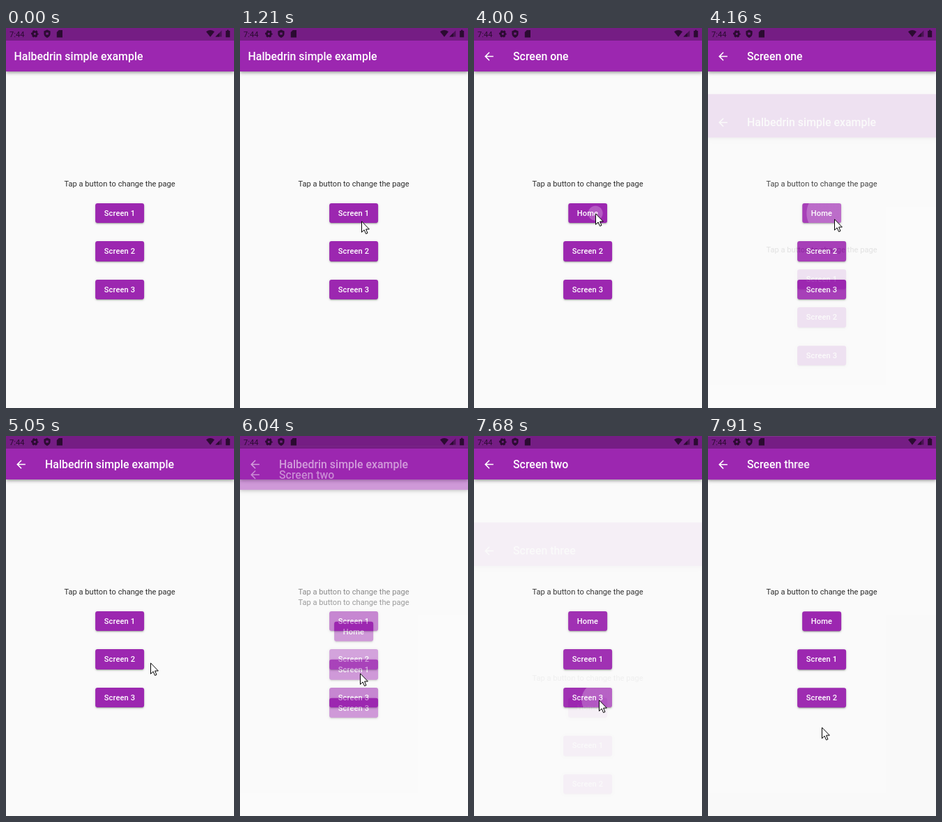
An HTML page for the animation above (7990 ms loop, 327 by 542 pixels).

```html
<!DOCTYPE html>
<html lang="en">
<head>
<meta charset="utf-8">
<title>Screen navigation</title>
<style>
  html, body { margin: 0; width: 100%; height: 100%; overflow: hidden; background: #fafafa; }
  body { position: relative; font: 11.13px Roboto, sans-serif; }
  .page, .bar, .title, .back, .hint, .button, #status, #cursor { position: absolute; }
  .page { left: 0; top: 0; width: 327px; height: 542px; background: #fafafa; color: rgba(0, 0, 0, .82); }
  .bar {
    left: 0; top: 0; width: 100%; height: 62px; background: #9c27b0;
    box-shadow: 0 1.6px 3.2px -.8px #0003, 0 3.2px 4px #00000024, 0 .8px 8px #0000001f;
  }
  .title { top: 18px; font-size: 15.9px; font-weight: 500; line-height: 46px; color: #fff; white-space: nowrap; }
  .back { left: 11.6px; top: 31px; width: 19px; height: 19px; fill: #fff; }
  .hint { top: 212px; width: 326px; line-height: 21px; text-align: center; }
  .button {
    left: 163px; transform: translateX(-50%); height: 28.6px; padding: 0 12.7px; border-radius: 3.2px;
    line-height: 30px; font-weight: 500; letter-spacing: .1px; color: #fff; background: #9c27b0; white-space: nowrap;
    box-shadow: 0 2.4px .8px -1.6px #0003, 0 1.6px 1.6px #00000024, 0 .8px 4px #0000001f;
  }
  #status, #cursor { left: 0; top: 0; }
</style>
</head>
<body>
<div id="pages"></div>

<svg id="status" width="327" height="18" fill="#2b0b31">
  <path d="M0 0H327V18H0Z" fill="#000" fill-opacity=".25"/>
  <text x="5" y="12.5" font-family="Roboto, sans-serif" font-size="11.13">7:44</text>
  <g fill="none" stroke="#2b0b31">
    <circle cx="41.3" cy="8.3" r="3" stroke-width="2.8"/>
    <circle cx="41.3" cy="8.3" r="4.6" stroke-width="1.4" stroke-dasharray="2.6 2.217" stroke-dashoffset="1.3"/>
  </g>
  <path d="M59 2.6 63.6 4.6V8C63.6 10.8 61.6 13.2 59 14 56.4 13.2 54.4 10.8 54.4 8V4.6Z"/>
  <path d="M57.2 6.5H60.8V9.6H57.2Z" fill="#751d84"/>
  <path d="M75.8 3H81V13.4H72.8V6Z"/>
  <path d="M287 5.2Q293 .8 299 5.2L293 12.8Z"/>
  <path d="M300.4 12.6 309.4 3.4V12.6Z" opacity=".6"/>
  <path d="M300.4 12.6 306 6.9V12.6Z"/>
  <path d="M315.2 4H317V2.8H319.4V4H321.2V13.2H315.2Z"/>
</svg>

<svg id="cursor" width="13" height="20">
  <path d="M.5.8V16.3L4.1 12.9 6.6 18.5 9 17.5 6.6 12H11.4Z" fill="#fff" stroke="#000"/>
</svg>

<script>
const LOOP = 7990, TRANSITION = 300, SLIDE = 135.5;
const CENTER_X = 163, BUTTON_TOP = 249.8, BUTTON_PITCH = 54.4, BUTTON_HEIGHT = 28.6;

const screens = [
  { label: 'Home', title: 'Halbedrin simple example' },
  { label: 'Screen 1', title: 'Screen one' },
  { label: 'Screen 2', title: 'Screen two' },
  { label: 'Screen 3', title: 'Screen three' }
];

// Each page covers the one before it; "press" is when the pointer taps one of its buttons.
const pages = [
  { screen: 0, start: 0, press: 1600, instant: true, root: true },
  { screen: 1, start: 2210, press: 3878, instant: true },
  { screen: 0, start: 4078, press: 5590 },
  { screen: 2, start: 5855, press: 7455 },
  { screen: 3, start: 7630 }
];

// Pointer stops with their arrival times.
const stops = [
  { at: 430, x: 272, y: 530 },
  { at: 1060, x: 158, y: 247 },
  { at: 1210, x: 174, y: 275 },
  { at: 1530, x: 166, y: 271 },
  { at: 2290, x: 166, y: 262 },
  { at: 3070, x: 234, y: 361 },
  { at: 3850, x: 174, y: 264 },
  { at: 4390, x: 234, y: 330 },
  { at: 5050, x: 207, y: 323 },
  { at: 5350, x: 163, y: 308 },
  { at: 5590, x: 171, y: 336 },
  { at: 6190, x: 183, y: 353 },
  { at: 6980, x: 179, y: 376 },
  { at: 7910, x: 163, y: 415 }
];

const clamp = (v, low, high) => Math.min(high, Math.max(low, v));

function bezier(x1, y1, x2, y2) {
  const at = (a, b, s) => 3 * a * s * (1 - s) ** 2 + 3 * b * s * s * (1 - s) + s ** 3;
  return x => {
    if (x <= 0 || x >= 1) return clamp(x, 0, 1);
    let low = 0, high = 1;
    for (let i = 0; i < 24; i++) {
      const mid = (low + high) / 2;
      if (at(x1, x2, mid) < x) low = mid; else high = mid;
    }
    return at(y1, y2, low);
  };
}
const slideEase = bezier(.4, 0, .2, 1);
const fadeEase = bezier(.42, 0, 1, 1);
const moveEase = k => k * k * (3 - 2 * k);

// The pointer rests at a stop, then leaves just in time for the next; longer ways take longer.
function pointerAt(time) {
  const next = stops.findIndex(stop => stop.at > time);
  if (next < 0) return stops.at(-1);
  const from = stops[next - 1], to = stops[next];
  const travel = Math.min(to.at - from.at, 150 + 1.6 * Math.hypot(to.x - from.x, to.y - from.y));
  const k = moveEase(clamp(1 - (to.at - time) / travel, 0, 1));
  return { x: from.x + (to.x - from.x) * k, y: from.y + (to.y - from.y) * k };
}

function buildPage({ screen, root }) {
  const page = document.createElement('div');
  page.className = 'page';
  const arrow = '<svg class="back" viewBox="0 0 24 24">' +
    '<path d="M20 11H7.8l5.6-5.6L12 4l-8 8 8 8 1.4-1.4L7.8 13H20z"/></svg>';
  const buttons = screens.filter((_, i) => i !== screen).map(({ label }, i) =>
    `<div class="button" style="top:${BUTTON_TOP + i * BUTTON_PITCH}px">${label}</div>`);
  page.innerHTML = `
    <div class="bar">${root ? '' : arrow}
      <div class="title" style="left:${root ? 11.5 : 56}px">${screens[screen].title}</div>
    </div>
    <div class="hint">Tap a button to change the page</div>
    ${buttons.join('')}`;
  document.getElementById('pages').append(page);
  return page;
}

const views = pages.map(buildPage);
const cursor = document.getElementById('cursor');

function drawPage({ start, instant }, view, time) {
  const progress = instant ? +(time >= start) : clamp((time - start) / TRANSITION, 0, 1);
  view.style.display = progress > 0 ? 'block' : 'none';
  view.style.opacity = fadeEase(progress);
  view.style.transform = progress < 1 ? `translateY(${SLIDE * (1 - slideEase(progress))}px)` : 'none';
}

// A splash grows a little under the pointer, then spreads as the next page opens.
function drawSplash({ press }, view, nextStart, time) {
  const { x, y } = pointerAt(press);
  const middle = BUTTON_TOP + BUTTON_HEIGHT / 2;
  const index = clamp(Math.round((y - middle) / BUTTON_PITCH), 0, 2);
  const radius = clamp((time - press) * .085, 0, 12) + Math.max(0, time - nextStart) * .25;
  const spot = `calc(50% + ${x - CENTER_X}px) ${y - BUTTON_TOP - index * BUTTON_PITCH}px`;
  view.querySelectorAll('.button')[index].style.backgroundImage = radius > 0
    ? `radial-gradient(circle at ${spot}, #ffffff3d ${Math.max(0, radius - .5)}px, #fff0 ${radius + .5}px)`
    : 'none';
}

function draw(time) {
  pages.forEach((page, i) => {
    drawPage(page, views[i], time);
    if (page.press) drawSplash(page, views[i], pages[i + 1].start, time);
  });

  const visible = time >= stops[0].at;
  cursor.style.display = visible ? 'block' : 'none';
  if (visible) {
    const { x, y } = pointerAt(time);
    cursor.style.transform = `translate(${Math.round(x)}px, ${Math.round(y)}px)`;
  }
}

function tick() {
  draw(performance.now() % LOOP);
  requestAnimationFrame(tick);
}
tick();
</script>
</body>
</html>
```
